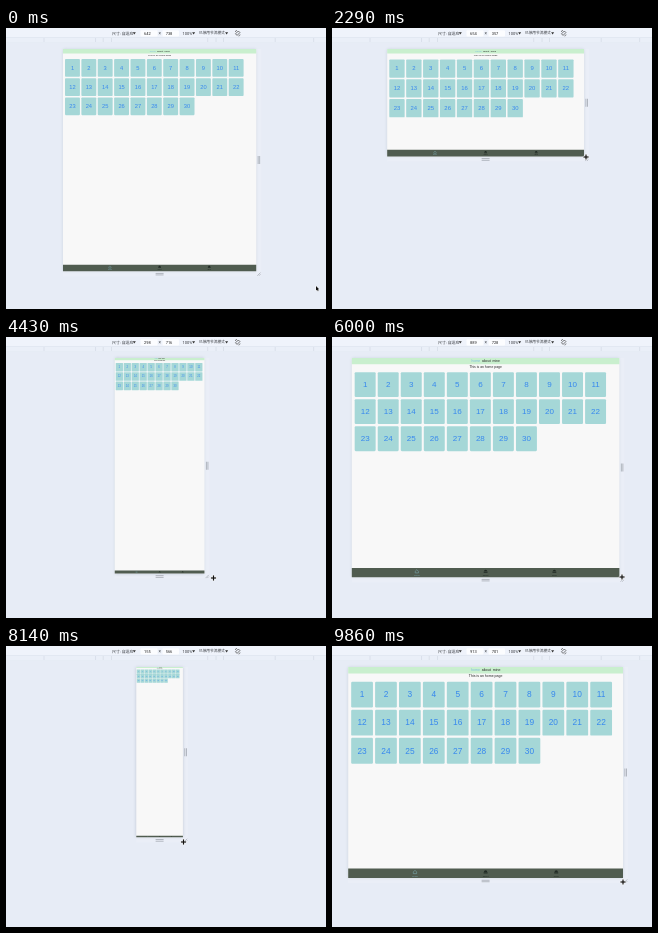
An HTML page with a canvas for the animation above (10000 ms loop, 320x281 px).

```html
<!DOCTYPE html>
<html lang="zh">
<head>
<meta charset="utf-8">
<title>Responsive page resize</title>
<style>
  html, body { margin: 0; width: 100%; height: 100%; overflow: hidden; background: #e7ecf6; }
  canvas { display: block; width: 320px; height: 281px; }
</style>
</head>
<body>
<canvas id="stage"></canvas>
<script>
const LOOP = 10000, STEPS = 70;
const SCALE = 0.301, MID = 153.6, TOP = 21;
const SANS = '"Liberation Sans", Arial, sans-serif';
const CJK = 'Roboto, "Noto Sans CJK SC", "Noto Sans CJK", sans-serif';

// step, page width, page height, pointer x, pointer y, column pitch / page width
const KEYS = [
  [0, 642, 738, 310, 258, .0847],
  [7, 642, 738, 253, 246, .0847],
  [8, 642, 738, 253, 246, .0847],
  [16, 654, 357, 254, 129, .0858],
  [23, 888, 644, 288.5, 226, .0861],
  [25, 898, 715, 291, 238, .0865],
  [30, 290, 722, 206, 242, .088],
  [31, 298, 716, 207.5, 241, .0886],
  [39, 862, 755, 286, 251, .086],
  [42, 889, 728, 290, 240, .0861],
  [44, 1005, 740, 308, 244, .086],
  [48, 645, 690, 253, 230, .087],
  [56, 152, 566, 177, 196, .084],
  [57, 155, 566, 177.5, 196, .084],
  [64, 905, 610, 292, 209, .087],
  [69, 913, 701, 291, 236, .087]
];

const canvas = document.getElementById('stage');
const dpr = window.devicePixelRatio || 1;
canvas.width = 320 * dpr;
canvas.height = 281 * dpr;
const c = canvas.getContext('2d');
c.scale(dpr, dpr);
c.textBaseline = 'middle';

function poseAt(step) {
  const i = Math.max(1, KEYS.findIndex(k => k[0] >= step));
  const a = KEYS[i - 1], b = KEYS[i];
  const u = (step - a[0]) / (b[0] - a[0]);
  const e = (u + u * u * (3 - 2 * u)) / 2;
  return a.map((v, n) => v + (b[n] - v) * e);
}

function rect(x, y, w, h, color, r = 0) {
  c.fillStyle = color;
  c.beginPath();
  c.roundRect(x, y, w, h, r);
  c.fill();
}

function text(s, x, y, size, color, align = 'center', font = SANS) {
  c.font = `${size}px ${font}`;
  c.textAlign = align;
  c.fillStyle = color;
  c.fillText(s, x, y);
}

function path(points, color, width, closed) {
  c.beginPath();
  points.forEach(([x, y]) => c.lineTo(x, y));
  if (closed) c.closePath();
  c.strokeStyle = color;
  c.lineWidth = width;
  c.stroke();
}

function caret(x) {
  c.fillStyle = '#333';
  c.beginPath();
  c.moveTo(x - 1.5, 4.2);
  c.lineTo(x + 1.5, 4.2);
  c.lineTo(x, 6.6);
  c.fill();
}

function drawToolbar(w, h) {
  const ink = '#3a3d42';
  rect(0, 0, 320, 9.5, '#eff3fb');
  rect(0, 9.5, 320, 5, '#eaeff8');
  rect(0, 9.3, 320, .5, '#dce2ed');
  rect(0, 14.2, 320, .4, '#dfe5ef');
  for (const size of [320, 375, 425, 768, 1024])
    for (const side of [-1, 1])
      rect(MID + side * size * SCALE / 2 - .4, 10, .8, 4, '#d6dce7');

  text('尺寸: 自适应', 106, 5.4, 3.9, ink, 'left', CJK);
  caret(128.3);
  rect(134.5, 2.2, 17, 6.4, '#fcfdff', 1);
  rect(156.5, 2.2, 16.5, 6.4, '#fcfdff', 1);
  text(Math.round(w), 141.3, 5.5, 4, '#222', 'center', CJK);
  text('×', 153.7, 5.5, 4.6, ink, 'center', CJK);
  text(Math.round(h), 163, 5.5, 4, '#222', 'center', CJK);
  text('100%', 176.5, 5.5, 4, ink, 'left', CJK);
  caret(187.6);
  text('已停用节流模式', 193, 5.4, 3.7, ink, 'left', CJK);
  caret(220.6);

  // rotate button
  c.save();
  c.translate(231.7, 5.2);
  c.rotate(Math.PI / 4);
  c.strokeStyle = '#444';
  c.lineWidth = .7;
  c.strokeRect(-1.1, -2, 2.2, 4);
  c.restore();
  path([[229.3, 4], [229.8, 2.8], [231, 2.4]], '#444', .6);
  path([[234.1, 6.4], [233.6, 7.6], [232.4, 8]], '#444', .6);
}

function drawHandles(right, bottom) {
  const grip = '#a3a8b1', cy = (TOP + bottom) / 2;
  for (const d of [-.8, .8]) {
    rect(right + 2.7 + d - .4, cy - 4, .8, 8, grip);
    rect(MID - 4, bottom + 3 + d - .4, 8, .8, grip);
  }
  const x = right + 4.3, y = bottom + 4.6;
  path([[x - 3.2, y], [x, y - 3.2]], grip, .7);
  path([[x - 1.5, y], [x, y - 1.5]], grip, .7);
}

function drawFooter(left, w, bottom, p) {
  const fh = .395 * p, y = bottom - fh;
  rect(left, y, w, fh, '#505c50');
  ['home', 'about', 'mine'].forEach((label, i) => {
    const x = MID + (i - 1) * w * .257;
    const color = i ? '#202a24' : '#79a6ad';
    const iy = y + fh * .36, r = p * .07;
    if (i === 0) {
      path([[x - r, iy], [x, iy - r], [x + r, iy], [x + r, iy + r], [x - r, iy + r]], color, p * .025, true);
    } else {
      c.fillStyle = color;
      c.beginPath();
      c.arc(x, iy, r, Math.PI, 0);
      c.fill();
      rect(x - r * 1.2, iy + r * .2, r * 2.4, r * .7, color);
    }
    text(label, x, y + fh * .78, p * .1, color);
  });
}

function drawPage(w, h, p) {
  const left = MID - w / 2, right = left + w, bottom = TOP + h;
  rect(left, TOP, w + 5, h + 5, '#eaeef7');
  c.save();
  c.shadowColor = 'rgba(80, 95, 120, .25)';
  c.shadowBlur = 3 * dpr;
  rect(left, TOP, w, h, '#f8f8f8');
  c.restore();

  rect(left, TOP, w, .27 * p, '#c9efce');
  const menuY = TOP + .145 * p, menuSize = .15 * p;
  text('home', MID - .42 * p, menuY, menuSize, '#79b8dc');
  text('about', MID + .03 * p, menuY, menuSize, '#222');
  text('mine', MID + .46 * p, menuY, menuSize, '#222');
  text('This is an home page', MID, TOP + .385 * p, .148 * p, '#222');

  for (let i = 0; i < 30; i++) {
    const x = left + (.125 + i % 11) * p;
    const y = TOP + (.615 + Math.floor(i / 11) * 1.174) * p;
    rect(x, y, .91 * p, 1.08 * p, '#a5d7d7', .05 * p);
    text(i + 1, x + .455 * p, y + .56 * p, .35 * p, '#3788ee');
  }
  drawFooter(left, w, bottom, p);
  drawHandles(right, bottom);
}

function drawPointer(x, y, arrow) {
  if (arrow) {
    const tip = [[0, 0], [0, 4.6], [1.1, 3.7], [1.9, 5.3], [2.6, 5], [1.9, 3.4], [3.2, 3.3]];
    path(tip.map(([a, b]) => [x + a, y + b]), '#fff', .9, true);
    c.fillStyle = '#111';
    c.fill();
    return;
  }
  for (const [len, thick, color] of [[6.2, 2.2, '#fff'], [5.2, 1.2, '#111']]) {
    rect(x - len / 2, y - thick / 2, len, thick, color);
    rect(x - thick / 2, y - len / 2, thick, len, color);
  }
}

function draw(now) {
  const step = Math.floor((now + 3) % LOOP * STEPS / LOOP);
  const [, w, h, x, y, ratio] = poseAt(step);
  rect(0, 0, 320, 281, '#e7ecf6');
  drawToolbar(w, h);
  drawPage(w * SCALE, h * SCALE, w * SCALE * ratio);
  drawPointer(x, y, step < 7);
}

let start;
function tick(now) {
  start ??= now;
  draw(now - start);
  requestAnimationFrame(tick);
}
requestAnimationFrame(tick);
</script>
</body>
</html>
```
